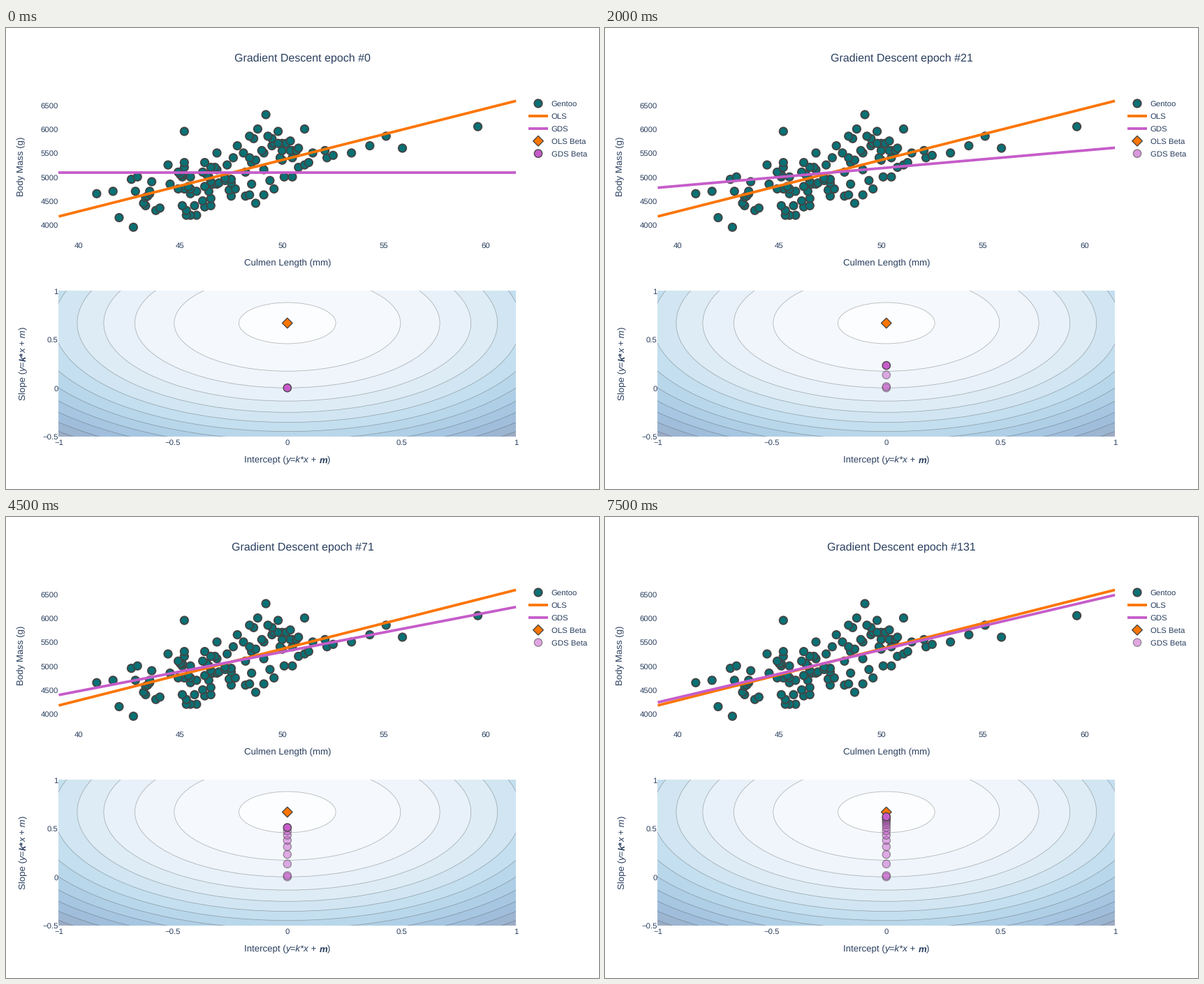
A matplotlib script that plays this animation: 849x660 px, repeating every 8 s.

```python
import numpy as np
import matplotlib.pyplot as plt
from matplotlib.animation import FuncAnimation
from matplotlib.patches import Circle, Ellipse, Polygon, Rectangle

W, H, DPI = 849, 660, 72          # at 72 dpi one point is one pixel
SCALE = W / 900
TITLE, AXIS, TICK = 17 * SCALE, 14 * SCALE, 12 * SCALE
INK, EDGE = "#2a3f5f", "#444444"
TEAL, ORANGE, ORCHID = "#087175", "#FB7504", "#C65CCA"
LEFT, RIGHT = 75.5, 730.1
TOP, BOTTOM = 376.2, 584.7

CORR = 0.667                      # optimum of the standardised slope
MEAN_X, MEAN_Y, OLS_SLOPE = 47.57, 5092, 107.5
EPOCHS = [0] + list(range(1, 132, 10))
DECAY = 0.98

# Culmen lengths for body masses from 3950 g upwards in 50 g steps
ROWS = [
    [42.7], [], [], [], [42.0], [45.8, 45.5, 45.3], [], [45.3, 43.8], [44.0],
    [43.3, 46.5, 45.1, 45.7], [48.7, 43.2], [46.1], [46.5],
    [48.2, 47.5, 43.4], [40.9, 45.5, 43.5], [42.8, 45.8, 43.5, 46.4, 41.7],
    [49.6, 47.7, 45.2, 44.9, 45.5], [45.4, 46.2], [46.6, 44.5, 48.5, 46.8],
    [43.6, 46.5], [42.6, 47.5], [45.1, 42.9, 50.1, 45.5, 46.4, 50.5],
    [46.3, 45.1, 45.0], [46.1, 44.9, 48.2], [46.8, 49.1],
    [46.7, 46.5, 50.8, 45.2], [47.3, 44.4, 51.1], [45.2, 48.5, 46.2, 51.3],
    [48.7, 50.0], [47.6, 48.4, 50.5, 52.2, 49.9], [52.5],
    [49.1, 46.8, 53.4, 48.1, 51.5], [49.0, 50.0, 50.5, 50.4, 50.7, 52.1],
    [50.8, 55.9], [47.8, 54.3, 49.5], [50.0, 50.2, 49.6, 49.8], [50.4],
    [49.5, 48.6], [48.4, 49.3, 55.1], [], [45.2, 49.8], [51.1, 48.8], [59.6],
    [], [], [], [], [49.2],
]
BETWEEN = {4375: [46.2], 4575: [43.3], 4625: [49.1, 48.4], 4725: [47.4],
           4875: [47.5, 46.9], 4925: [49.4, 47.2], 4975: [47.2]}

BLUES = np.array([(247, 251, 255), (222, 235, 247), (198, 219, 239),
                  (158, 202, 225), (107, 174, 214), (66, 146, 198),
                  (33, 113, 181), (8, 81, 156), (8, 48, 107)]) / 255

plt.rcParams.update({"font.family": "Liberation Sans", "text.hinting": "none",
                     "text.color": INK})
fig = plt.figure(figsize=(W / DPI, H / DPI), dpi=DPI, facecolor="white")
ax = fig.add_axes([0, 0, 1, 1])
ax.set(xlim=(0, W), ylim=(H, 0))
ax.axis("off")


def length_px(length):
    return 103.6 + (length - 40) * 29.18


def mass_px(mass):
    return 213.2 - (mass - 5000) * 0.0686


def intercept_px(m):
    return (LEFT + RIGHT) / 2 + m * (RIGHT - LEFT) / 2


def slope_px(k):
    return TOP + (1 - k) * (BOTTOM - TOP) / 1.5


def label(x, y, text, size, ha="center"):
    """Text whose capitals are centred on y."""
    return ax.text(x, y + 0.36 * size, text, size=size, ha=ha, va="baseline")


def styled(x, y, runs, rotation=0):
    """Centred line of (text, style, weight, advance in em) runs."""
    offset = -sum(run[3] for run in runs) / 2 * AXIS
    angle = np.radians(rotation)
    for text, style, weight, advance in runs:
        ax.text(x + offset * np.cos(angle), y - offset * np.sin(angle), text,
                size=AXIS, style=style, weight=weight, rotation=rotation,
                rotation_mode="anchor", ha="left", va="baseline")
        offset += advance * AXIS


def dot(x, y, color, line):
    return ax.add_patch(Circle((x, y), 6 * SCALE, fc=color, ec=EDGE, lw=line))


def diamond(x, y):
    r = 7.8 * SCALE
    ax.add_patch(Polygon([(x - r, y), (x, y - r), (x + r, y), (x, y + r)],
                         fc=ORANGE, ec=EDGE, lw=1.3))


def stroke(xs, ys, color):
    return ax.plot(xs, ys, color=color, lw=4 * SCALE, solid_capstyle="butt")[0]


def line_ys(slope):
    return [mass_px(MEAN_Y + slope * (x - MEAN_X)) for x in ENDS]


# Scatter plot with both fits
ENDS = (39.04, 61.47)
points = [(x, 3950 + 50 * i) for i, row in enumerate(ROWS) for x in row]
points += [(x, mass) for mass, row in BETWEEN.items() for x in row]
for x, mass in sorted(points, key=lambda p: p[1]):
    dot(length_px(x), mass_px(mass), TEAL, 2 * SCALE)
stroke((LEFT, RIGHT), line_ys(OLS_SLOPE), ORANGE)
gds_line = stroke((LEFT, RIGHT), line_ys(0), ORCHID)

for mass in range(4000, 6501, 500):
    label(74.8, mass_px(mass) + 0.2, str(mass), TICK, "right")
for x in range(40, 61, 5):
    label(length_px(x), 311, str(x), TICK)
label(402.8, 336, "Culmen Length (mm)", AXIS)
ax.text(25.6, 198, "Body Mass (g)", size=AXIS, rotation=90,
        rotation_mode="anchor", ha="center", va="baseline")

# Loss contours: circles around the optimum in parameter space
levels = np.arange(0.6, 2.81, 0.2)
shade = np.linspace(0, 1, len(levels) + 1)
bands = [np.interp(shade, np.linspace(0, 1, 9), BLUES[:, c]) for c in range(3)]
bands = 1 - 0.4 * (1 - np.array(bands).T)
frame = ax.add_patch(Rectangle((LEFT, TOP), RIGHT - LEFT, BOTTOM - TOP,
                               fc=bands[-1], lw=0))
for level, color in reversed(list(zip(levels, bands))):
    radius = np.sqrt(level - (1 - CORR ** 2))
    size = (radius * (RIGHT - LEFT), 2 * radius * (BOTTOM - TOP) / 1.5)
    center = (intercept_px(0), slope_px(CORR))
    for style in (dict(fc=color, lw=0),
                  dict(fill=False, ec=EDGE, lw=0.75, alpha=0.4)):
        ax.add_patch(Ellipse(center, *size, **style)).set_clip_path(frame)

diamond(intercept_px(0), slope_px(CORR))
betas = [CORR * (1 - DECAY ** epoch) for epoch in EPOCHS]
trail = [dot(intercept_px(0), slope_px(b), ORCHID, 1.3) for b in betas]

for k, text in ((1, "1"), (0.5, "0.5"), (0, "0"), (-0.5, "−0.5")):
    label(74.5, slope_px(k) + 0.3, text, TICK, "right")
for m, text in ((-1, "−1"), (-0.5, "−0.5"), (0, "0"), (0.5, "0.5"), (1, "1")):
    label(intercept_px(m), 593, text, TICK)
styled(402.8, 622.6, [("Intercept (", "normal", "normal", 4.502),
                      ("y=k*x + ", "italic", "normal", 3.613),
                      ("m", "italic", "bold", 0.889),
                      (")", "normal", "normal", 0.333)])
styled(28.6, 480.5, [("Slope (", "normal", "normal", 3.168),
                     ("y=", "italic", "normal", 1.084),
                     ("k*", "italic", "bold", 0.945),
                     ("x + m", "italic", "normal", 2.473),
                     (")", "normal", "normal", 0.333)], rotation=90)

# Legend
legend_y = [108 + 19 * SCALE * i for i in range(5)]
for y, text in zip(legend_y, ("Gentoo", "OLS", "GDS", "OLS Beta", "GDS Beta")):
    label(780.8, y + 0.2, text, TICK, "left")
dot(762, legend_y[0], TEAL, 2 * SCALE)
stroke((748, 776.2), [legend_y[1]] * 2, ORANGE)
stroke((748, 776.2), [legend_y[2]] * 2, ORCHID)
diamond(762, legend_y[3])
legend_beta = dot(762, legend_y[4], ORCHID, 1.3)

title = label(424.5, 42, "", TITLE)


def update(frame_no):
    step = max(frame_no - 1, 0)
    title.set_text(f"Gradient Descent epoch #{EPOCHS[step]}")
    gds_line.set_ydata(line_ys(OLS_SLOPE * betas[step] / CORR))
    for i, marker in enumerate(trail):
        marker.set_visible(i <= step)
        marker.set_alpha(1 if i == step else 0.5)
    legend_beta.set_alpha((0.5 * step + 1) / (step + 1))
    return [title, gds_line, legend_beta, *trail]


anim = FuncAnimation(fig, update, frames=16, interval=500, repeat=True,
                     repeat_delay=0, blit=False)
plt.show()
```
